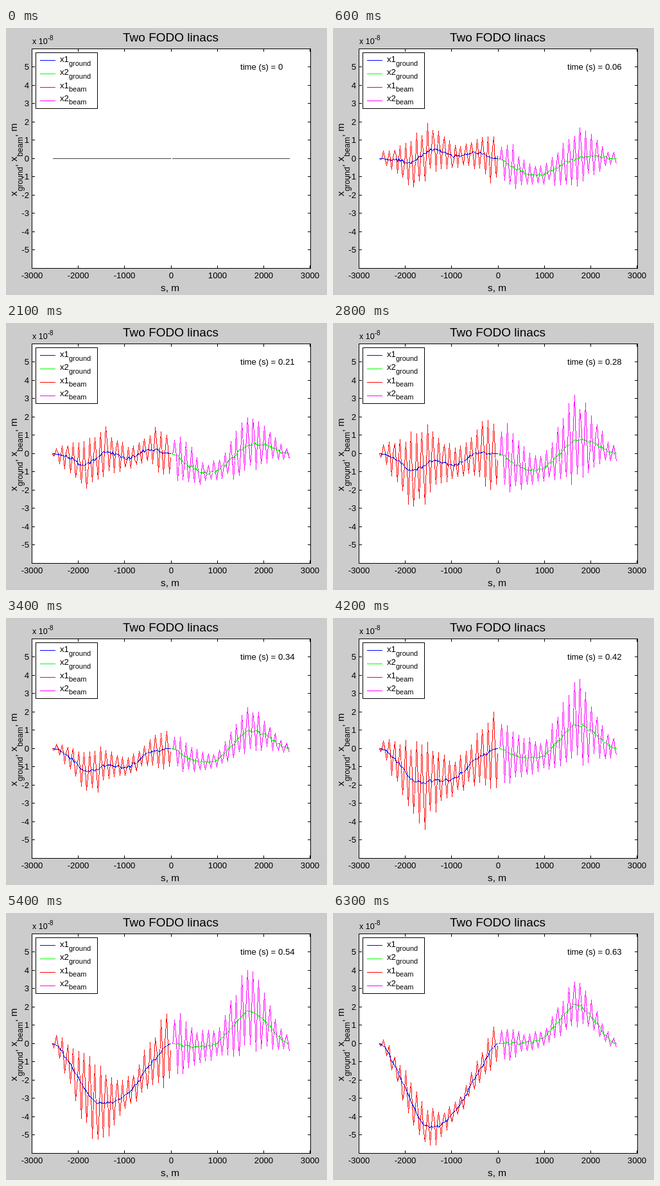
These frames come from a looping animation (500x416 px, 6400 ms). An HTML page:

```html
<!DOCTYPE html>
<html lang="en">
<head>
<meta charset="utf-8">
<title>Two FODO linacs</title>
<style>
  html, body { margin: 0; width: 100%; height: 100%; overflow: hidden; background: #ccc; }
  svg { display: block; width: 500px; height: 416px; font: 13.2px "Liberation Sans", Arial, sans-serif; }
  .line { fill: none; stroke-width: 1; shape-rendering: crispEdges; }
</style>
</head>
<body>
<svg viewBox="0 0 500 416">
  <defs><clipPath id="area"><rect x="40" y="32" width="435" height="343"/></clipPath></defs>
  <rect width="500" height="416" fill="#ccc"/>
  <rect class="line" x="40.5" y="32.5" width="434" height="342" style="fill:#fff" stroke="#000"/>
  <g id="ticks"></g>
  <g id="curves" clip-path="url(#area)"></g>
  <rect class="line" x="46.5" y="38.5" width="96" height="87" style="fill:#fff" stroke="#000"/>
  <g id="legend"></g>
  <text x="256.5" y="21" text-anchor="middle" font-size="19">Two FODO linacs</text>
  <text x="41" y="25" font-size="12.5">x 10<tspan dy="-6" font-size="10">-8</tspan></text>
  <text x="255.5" y="410" text-anchor="middle" font-size="15.4">s, m</text>
  <text transform="translate(17 262) rotate(-90)" font-size="15.3">x<tspan dy="9" font-size="12.2">ground</tspan><tspan dy="-9">, x</tspan><tspan dy="9" font-size="12.2">beam</tspan><tspan dy="-9">, m</tspan></text>
  <text id="clock" x="365" y="65"></text>
</svg>
<script>
const $ = id => document.getElementById(id);
const STEPS = 64, STEP_MS = 100, ZERO_Y = 203;

// Shapes are sums of bumps [centre, width, height]; positive moves down.
// drift grows over the loop, ripple comes early and fades, swing is the beam envelope.
const linacs = [
  {
    x0: 72, x1: 256, n: 86, peak: 3, seed: 1, ground: "#00f", beam: "#f00",
    drift: [[0.36, 0.22, 100], [0.64, 0.24, 85]], growth: 1.9,
    ripple: [[0.25, 0.08, 8], [0.47, 0.12, -19], [0.8, 0.14, -12]],
    swing: [[0.35, 0.24, 50], [1, 0.24, 46]]
  },
  {
    x0: 258, x1: 441, n: 84, peak: 2, seed: 2, ground: "#0f0", beam: "#f0f",
    drift: [[0.66, 0.21, -60]], growth: 1,
    ripple: [[0.33, 0.26, 32]],
    swing: [[0, 0.26, 42], [0.66, 0.22, 50]]
  }
];

const bumps = (list, s) =>
  list.reduce((sum, [c, w, h]) => sum + h * Math.exp(-(((s - c) / w) ** 2)), 0);

// repeatable noise in -1..1
function noise(a, b) {
  const v = Math.sin(a * 127.1 + b * 311.7) * 43758.5453;
  return (v - Math.floor(v)) * 2 - 1;
}

// noise that changes gradually with t
function slowNoise(a, b, t) {
  const k = Math.floor(t), u = t - k;
  return noise(a, b + k) * (1 - u) + noise(a, b + k + 1) * u;
}

function add(parent, tag, attrs, text = "") {
  const el = document.createElementNS("http://www.w3.org/2000/svg", tag);
  for (const k in attrs) el.setAttribute(k, attrs[k]);
  el.textContent = text;
  return parent.appendChild(el);
}

const addLine = (parent, d, stroke) => add(parent, "path", { class: "line", d, stroke });

function drawTicks() {
  const g = $("ticks");
  for (let k = -3; k <= 3; k++) {
    const x = Math.floor(257 + k * 72.33) + 0.5;
    addLine(g, `M${x} 32v5M${x} 375v-5`, "#000");
    add(g, "text", { x, y: 390, "text-anchor": "middle" }, k * 1000);
  }
  for (let k = -5; k <= 5; k++) {
    const y = Math.floor(ZERO_Y - k * 28.5) + 0.5;
    addLine(g, `M40 ${y}h5M475 ${y}h-5`, "#000");
    add(g, "text", { x: 36, y: y + 4.5, "text-anchor": "end" }, k);
  }
}

function drawLegend() {
  ["ground", "beam"].forEach((kind, j) => linacs.forEach((linac, i) => {
    const row = j * 2 + i;
    addLine($("legend"), `M53 ${50.5 + row * 21}h24`, linac[kind]);
    const label = add($("legend"), "text", { x: 84, y: 53 + row * 20.3 }, "x" + (i + 1));
    add(label, "tspan", { dy: 5.5, "font-size": 11 }, kind);
  }));
}

function trace(linac, step) {
  const { x0, x1, n, peak, seed } = linac;
  const u = step / (STEPS - 1);
  const grown = u ** linac.growth;
  const fade = Math.sin(Math.PI * Math.sqrt(u));
  const onset = Math.min(1, step / 6);
  const beat = onset * (0.88 + 0.3 * Math.cos((step - 11) / 15 * 2 * Math.PI));
  const ground = [], beam = [];

  for (let i = 0; i <= n; i++) {
    const s = i / n;
    const edge = Math.min(1, s * 10, (1 - s) * 10);
    const g = edge * (grown * bumps(linac.drift, s) + fade * bumps(linac.ripple, s)
      + onset * 3 * slowNoise(i, seed, step / 20));
    // four samples per oscillation: peak, crossing, trough, crossing
    const wave = Math.round(Math.cos((i - peak) * Math.PI / 2));
    const uneven = slowNoise(i, seed + 40, step / 10);
    const amp = beat * (6 + bumps(linac.swing, s)) * Math.min(1, i / 3);
    const b = g - amp * (wave ? wave * (0.95 + 0.25 * uneven) : 0.25 * uneven);
    const x = Math.round(x0 + (x1 - x0) * s) + 0.5;
    ground.push(x + " " + (Math.round(ZERO_Y + g) + 0.5));
    beam.push(x + " " + (Math.round(ZERO_Y + b) + 0.5));
  }
  return { ground: "M" + ground.join("L"), beam: "M" + beam.join("L") };
}

drawTicks();
drawLegend();
for (const linac of linacs)
  linac.paths = { beam: addLine($("curves")), ground: addLine($("curves")) };

function draw(step) {
  $("clock").textContent = "time (s) = " + step / 100;
  for (const linac of linacs) {
    const d = trace(linac, step);
    for (const kind in d) {
      linac.paths[kind].setAttribute("d", d[kind]);
      linac.paths[kind].setAttribute("stroke", step ? linac[kind] : "#444");
    }
  }
}

const start = performance.now();
let shown = -1;
function tick() {
  const step = Math.floor((performance.now() - start) / STEP_MS) % STEPS;
  if (step !== shown) draw(shown = step);
  requestAnimationFrame(tick);
}
tick();
</script>
</body>
</html>
```
